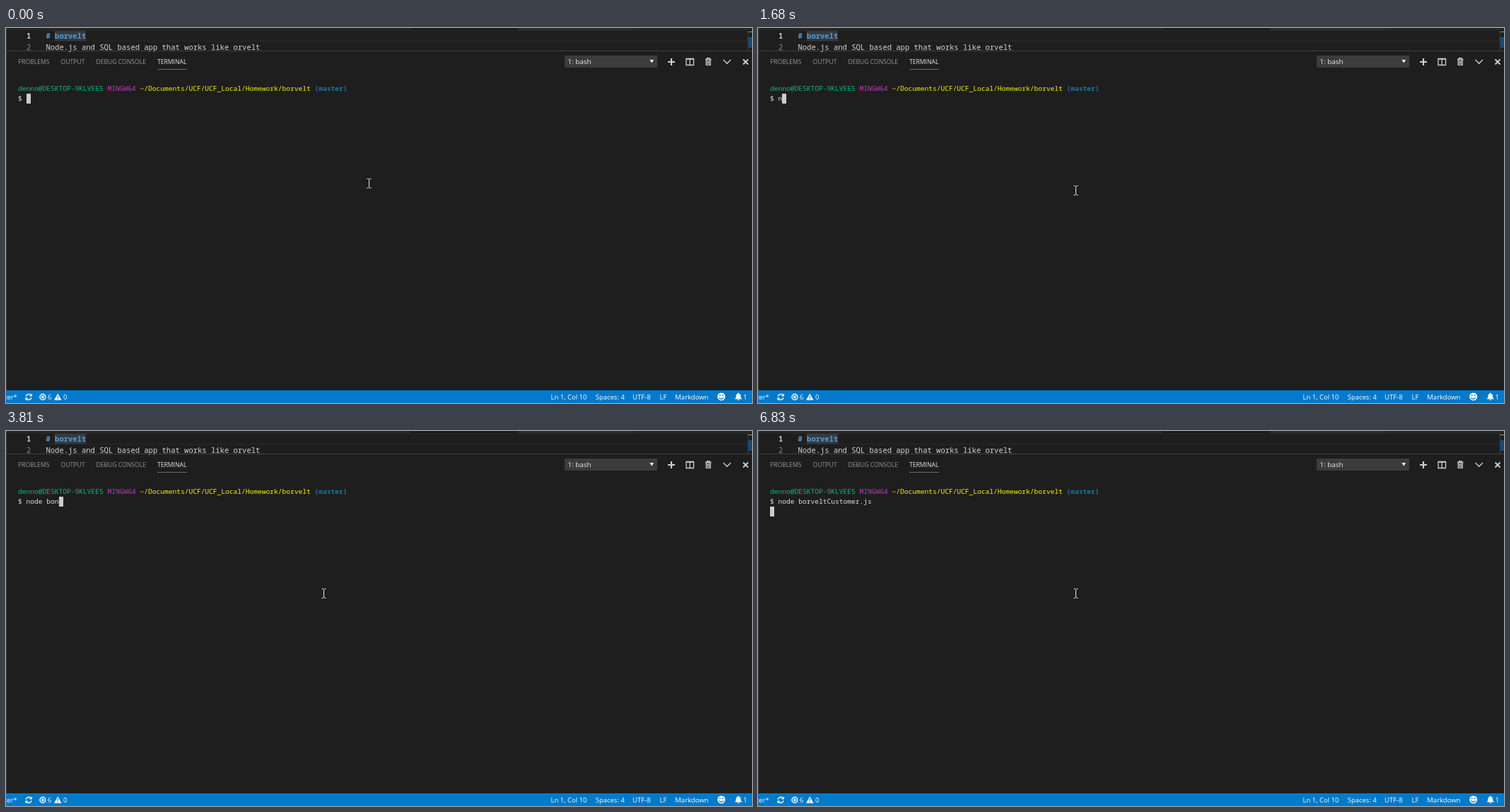
Animation, 1055 px wide and 531 px high, one loop 8 s. Source, as an HTML page:

```html
<!DOCTYPE html>
<html lang="en">
<head>
<meta charset="utf-8">
<title>Terminal</title>
<style>
  html, body { margin: 0; width: 100%; height: 100%; overflow: hidden; background: #1e1e1e; }
  svg { display: block; }
  text { white-space: pre; }
  .code { font: 10.52px "Noto Sans Mono", "DejaVu Sans Mono", monospace; fill: #d4d4d4; }
  .term { font: 9.58px "Noto Sans Mono", "DejaVu Sans Mono", monospace; fill: #e0e0e0; }
  .tabs { font: 8.6px "Open Sans", "Noto Sans", sans-serif; fill: #969696; }
  .ui { font: 9.5px "Open Sans", "Noto Sans", sans-serif; fill: #fff; }
  .line { fill: none; stroke: #d0d0d0; stroke-width: 1.3; }
</style>
</head>
<body>
<svg width="1055" height="531" viewBox="0 0 1055 531">
  <rect width="1055" height="531" fill="#1e1e1e"/>

  <!-- editor -->
  <rect width="1055" height="3" fill="#252526"/>
  <rect x="572" width="152" height="3" fill="#1a1a1a"/>
  <rect x="724" width="166" height="3" fill="#2b2b2c"/>
  <path d="M50 3.5H1049M50 18.5H1049" stroke="#2a2a2a"/>
  <rect x="69" y="4" width="44" height="14" fill="#343a40"/>
  <g class="code">
    <text x="29" y="15" fill="#c6c6c6" font-weight="bold">1</text>
    <text x="29" y="30.5" style="fill:#858585">2</text>
    <text x="56.5" y="15" style="fill:#569cd6;font-weight:bold"># borvelt</text>
    <text x="56.5" y="30.5">Node.js and SQL based app that works like orvelt</text>
  </g>
  <path d="M1049.5 3V32" stroke="#3c3c3c"/>
  <rect x="1050" y="5" width="5" height="1" fill="#999"/>
  <rect x="1050" y="13" width="5" height="15" fill="#0f4a85"/>

  <!-- panel header -->
  <path d="M0 32.5H1055M.5 0V513" stroke="#414141"/>
  <g class="tabs">
    <text x="17" y="51">PROBLEMS</text>
    <text x="77.5" y="51">OUTPUT</text>
    <text x="127.5" y="51">DEBUG CONSOLE</text>
    <text x="214" y="51" fill="#e7e7e7" style="fill:#e7e7e7">TERMINAL</text>
  </g>
  <path d="M214 58.5H256" stroke="#6c6c6c"/>
  <rect x="790" y="39" width="131" height="17" fill="#3c3c3c"/>
  <text class="ui" x="794.5" y="51.3" style="font-size:9.8px;fill:#f0f0f0">1: bash</text>
  <path d="M910.5 45H916L913.2 49.5Z" fill="#fff"/>
  <g class="line">
    <path d="M936 48H946M941 43V53" stroke-width="2.2"/>
    <path d="M962 43.5H972.5V52.5H962ZM967.2 43V53M962 44H972.5"/>
    <path d="M989 44.5H997.5M991.5 44V42.7H995V44"/>
    <path d="M990.3 45V52.3H996.2V45M992.3 46V51M994.3 46V51"/>
    <path d="M1014.5 45L1019.7 50.3L1025 45"/>
    <path d="M1042.5 44.5L1049.5 51.5M1049.5 44.5L1042.5 51.5" stroke-width="1.8"/>
  </g>

  <!-- terminal -->
  <g class="term">
    <text x="17" y="89.3"><tspan fill="#0dbc79">denno@DESKTOP-9KLVEE5</tspan> <tspan fill="#bc3fbc">MINGW64</tspan> <tspan fill="#f5f50a">~/Documents/UCF/UCF_Local/Homework/borvelt</tspan> <tspan fill="#11a8cd">(master)</tspan></text>
    <text x="17" y="103.3" id="command"></text>
  </g>
  <rect id="caret" width="6" height="14" fill="#ccc"/>
  <path id="mouse" d="M-3 -6.5H-1L0 -5.5L1 -6.5H3M0 -6V6M-3 6.5H-1L0 5.5L1 6.5H3" fill="none" stroke="#e8e8e8"/>

  <!-- status bar -->
  <rect y="513" width="1055" height="18" fill="#007acc"/>
  <g class="ui">
    <text x="-2" y="526">ter*</text>
    <text x="59" y="526">6</text>
    <text x="81" y="526">0</text>
    <text x="770.5" y="526">Ln 1, Col 10</text>
    <text x="833.7" y="526">Spaces: 4</text>
    <text x="886" y="526">UTF-8</text>
    <text x="924.5" y="526">LF</text>
    <text x="946.3" y="526">Markdown</text>
    <text x="1042.5" y="526">1</text>
  </g>
  <g fill="none" stroke="#fff" stroke-width="1.5">
    <path d="M28.3 521.7A4 4 0 0 1 35.2 519.8M35.9 523.3A4 4 0 0 1 29 525.2"/>
    <circle cx="52" cy="522.5" r="4"/>
    <path d="M50.3 520.8L53.7 524.2M53.7 520.8L50.3 524.2"/>
  </g>
  <g fill="#fff">
    <path d="M36.8 517.5V521.5H32.8ZM27.4 527.5V523.5H31.4Z"/>
    <path d="M73.3 517.5L78.5 527H68Z"/>
    <circle cx="1011.7" cy="522" r="5.5"/>
    <path d="M1030.5 525.5Q1032.5 524 1032.5 521Q1032.7 518 1035 517.7V516.7H1036.5V517.7Q1039 518 1039 521Q1039 524 1041 525.5ZM1034 526.3H1037.5Q1036 528.5 1034 526.3Z"/>
  </g>
  <g fill="none" stroke="#007acc" stroke-width="1.3">
    <path d="M73.3 520.5V523.5M73.3 524.7V526"/>
    <path d="M1009.6 519.3V521.3M1013.8 519.3V521.3M1008.5 523.3Q1011.7 527.3 1014.9 523.3"/>
  </g>
</svg>
<script>
const LOOP = 8000, CELL = 5.75, LEFT = 17;

// [start time, typed text]
const typing = [
  [0, ""], [1680, "n"], [2000, "no"], [2080, "nod"], [2400, "node"], [2930, "node "],
  [3250, "node b"], [3570, "node bo"], [3810, "node bon"], [4350, "node bo"],
  [4580, "node bor"], [4810, "node borv"], [5270, "node borvelt"],
  [5980, "node borveltC"], [6360, "node borveltCustomer.js "]
];
const ENTER = 6830;

// [start time, x, y]
const moves = [
  [0, 513, 220], [70, 511, 214], [140, 504, 209], [210, 489, 212], [290, 470, 220],
  [370, 456, 227], [440, 449, 230], [520, 444, 231], [570, 446, 231], [620, 449, 230]
];

const byId = id => document.getElementById(id);
const command = byId("command"), caret = byId("caret"), mouse = byId("mouse");
const latest = (steps, t) => steps.filter(([start]) => start <= t).pop();

function draw(t) {
  const line = "$ " + latest(typing, t)[1];
  const entered = t >= ENTER;
  command.textContent = line;
  caret.setAttribute("x", Math.round(LEFT + (entered ? 0 : line.length * CELL)));
  caret.setAttribute("y", entered ? 107 : 93);
  const [, x, y] = latest(moves, t);
  mouse.setAttribute("transform", `translate(${x + .5} ${y})`);
}

const begin = performance.now();
function tick() {
  draw((performance.now() - begin) % LOOP);
  requestAnimationFrame(tick);
}
tick();
</script>
</body>
</html>
```
